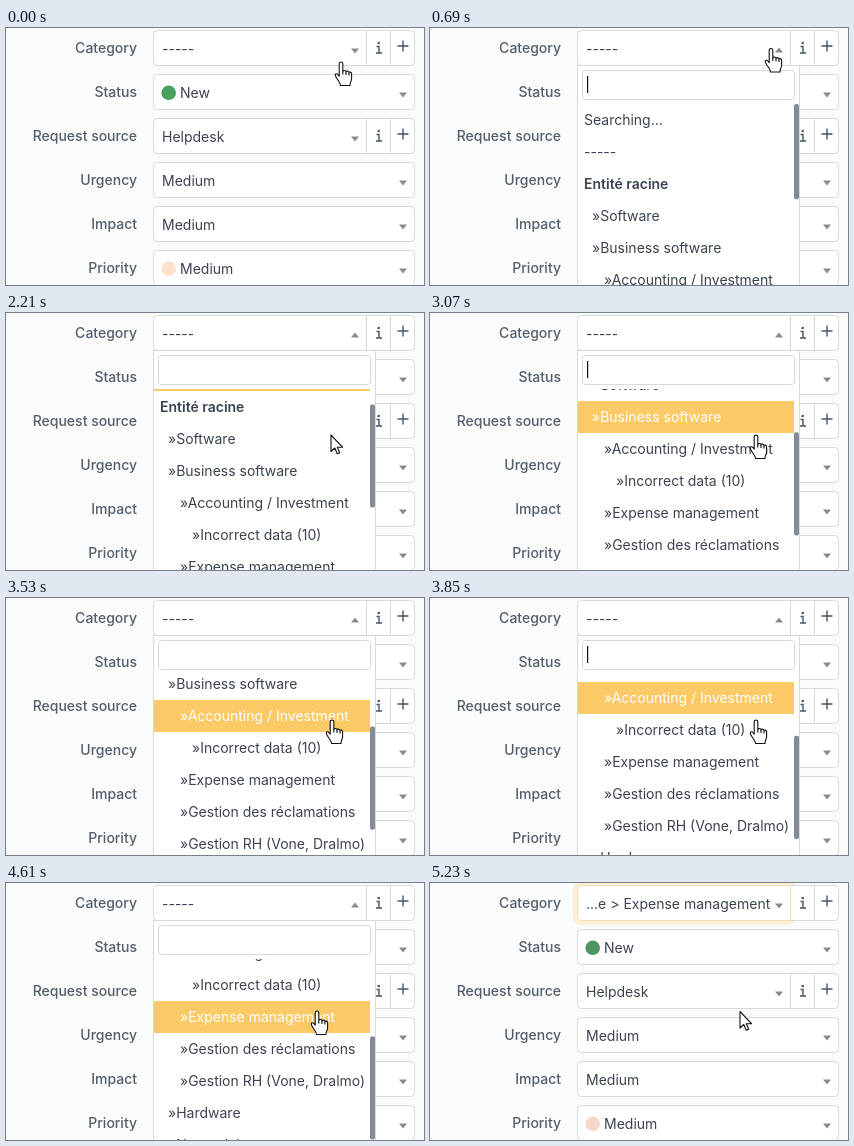
These frames come from a looping animation (418x257 px, 5590 ms). An HTML page:

```html
<!DOCTYPE html>
<html lang="en">
<head>
<meta charset="utf-8">
<title>Category picker</title>
<style>
html, body { margin: 0; width: 100%; height: 100%; overflow: hidden; background: #fafcfc; }
svg { display: block; width: 100vw; height: 100vh; }
text { font: 14px Inter, "Open Sans", sans-serif; fill: #3b4350; white-space: pre; }
.label { font-weight: 500; fill: #545d6b; text-anchor: end; }
.group { font-weight: 600; }
.box { fill: #fff; stroke: #d6dadd; }
.tri { fill: #878b90; }
.icon { fill: none; stroke: #46566a; stroke-width: 1.4; }
.on { fill: #fff; }
.pointer { fill: #fff; stroke: #111; stroke-width: 1.1; stroke-linejoin: round; }
</style>
</head>
<body>
<svg id="stage" viewBox="0 0 418 257">
  <defs><clipPath id="view"><rect x="148" y="76" width="221" height="200"/></clipPath></defs>
  <g id="form"></g>
  <g id="drop">
    <rect class="box" x="147.5" y="37.5" width="222" height="260"/>
    <rect class="box" x="152.5" y="42.5" width="212" height="29" rx="3"/>
    <rect id="caret" x="157" y="48" width="1.2" height="17" fill="#111"/>
    <g clip-path="url(#view)">
      <g id="list"><rect id="mark" x="148" width="216" height="32" fill="#fbca66"/></g>
      <rect id="thumb" x="364" width="5" rx="2" fill="#858a98"/>
    </g>
  </g>
  <g id="cursor" class="pointer">
    <path id="arrow" d="M0 0V16.5L3.8 13 6.2 18.7 8.7 17.7 6.3 12.2H11.5Z"/>
    <g id="hand" transform="translate(1)">
      <path d="M-1.8 1.8a1.8 1.8 0 0 1 3.6 0V9.5c0-1.5 3.2-1.5 3.2.5c0-1.3 3-1.2 3 .8c0-1.2 2.6-1 2.6 1V17c0 2-1.6 3-1.6 6.5H-.5c0-3-2.5-4.5-4.5-8.5c-.8-1.6-1.2-2.8.2-3.2c1.3-.3 2.2 1.2 3 2.4Z"/>
      <path fill="none" d="M1.8 9.5v3M5 10v3M8 11v2.5"/>
    </g>
    <path id="beam" fill="none" d="M-3-8h2.5l.5.5.5-.5H3M0-7.500V7.500M-3 8h2.5l.5-.5.5.5H3"/>
  </g>
</svg>
<script>
const LOOP = 5590, ROW = 32, TOP = 76, VIEW = 200;
const OPEN = 620, LOADED = 920, CLOSE = 4990;
const $ = id => document.getElementById(id);

function add(parent, tag, attrs, text) {
  const node = document.createElementNS('http://www.w3.org/2000/svg', tag);
  for (const key in attrs) node.setAttribute(key, attrs[key]);
  if (text) node.textContent = text;
  return parent.appendChild(node);
}

const form = $('form');
const glow = add(form, 'rect', { x: 143, y: -2, width: 222, height: 44, rx: 7, fill: '#fdefd5' });

function field(i, name, value, buttons, dot) {
  const y = 44 * i + 20, end = buttons ? 361 : 409, mid = end - 12;
  add(form, 'text', { class: 'label', x: 131, y: y + 5 }, name);
  if (buttons) {
    add(form, 'rect', { class: 'box', x: 340.5, y: y - 17.5, width: 68, height: 35, rx: 4 });
    add(form, 'path', { class: 'box', d: `M384.5 ${y - 17.500}v35` });
    add(form, 'path', { class: 'icon', d: `M370.500 ${y - 1.5}h2.5v6.500M370 ${y + 5}h6M391.500 ${y - 2}h11M397 ${y - 7.5}v11` });
    add(form, 'circle', { cx: 372.7, cy: y - 5, r: 1.3, fill: '#46566a' });
  }
  const box = buttons
    ? add(form, 'path', { class: 'box', d: `M360.500 ${y - 17.5}v35H151.500q-4 0-4-4v-27q0-4 4-4Z` })
    : add(form, 'rect', { class: 'box', x: 147.5, y: y - 17.5, width: 261, height: 35, rx: 4 });
  const circle = dot && add(form, 'circle', { cx: 162.7, cy: y + 0.8, r: 7.3 });
  const text = add(form, 'text', { x: dot ? 174 : 156, y: y + 5.5 }, value);
  const tri = add(form, 'path', { class: 'tri', d: `M${mid - 4} ${y + .5}h8l-4 5Z` });
  return { box, circle, text, tri };
}

const category = field(0, 'Category', '-----', true);
const state = field(1, 'Status', 'New', false, true);
field(2, 'Request source', 'Helpdesk', true);
field(3, 'Urgency', 'Medium');
field(4, 'Impact', 'Medium');
const priority = field(5, 'Priority', 'Medium', false, true);

const options = [
  [154, '-----'], [154, 'Entité racine'], [162, '»Software'], [162, '»Business software'],
  [174, '»Accounting / Investment'], [186, '»Incorrect data (10)'], [174, '»Expense management'],
  [174, '»Gestion des réclamations'], [174, '»Gestion RH (Vone, Dralmo)'],
  [162, '»Hardware'], [162, '»Network issue']
].map(([x, label], i) =>
  add($('list'), 'text', { x, y: TOP + ROW * i + 21, class: i === 1 ? 'group' : '' }, label));
const loading = add($('list'), 'text', { x: 154, y: TOP - 11 }, 'Searching…');

// Each list holds [start time, value...]; a value stays until the next entry.
const scrolls = [[0, 0], [1990, 8], [2070, 18], [2140, 26], [2210, 30], [2530, 46], [2610, 60],
  [2990, 70], [3070, 84], [3150, 88], [3230, 90], [3530, 102], [3610, 114], [3690, 120],
  [3990, 132], [4070, 144], [4150, 150]];
const marks = [[0, -1], [LOADED, 0], [2530, 2], [2990, 3], [3530, 4], [3990, 5], [4470, 6]];
const moves = [[0, 334, 34, 'hand'], [80, 336, 30, 'hand'], [150, 339, 24, 'hand'], [220, 340, 20.5, 'hand'],
  [1070, 340, 24, 'hand'], [1130, 339, 34, 'hand'], [1210, 337, 50, 'beam'], [1290, 335, 68, 'beam'],
  [1350, 333, 82, 'hand'], [1430, 332, 94, 'hand'], [1510, 329, 104, 'hand'], [1590, 327, 115, 'arrow'],
  [1670, 326, 119, 'arrow'], [1750, 325, 122, 'arrow'], [2530, 325, 122, 'hand'], [4470, 320, 124, 'hand'],
  [4530, 315, 126, 'hand'], [4610, 310, 128, 'hand'], [CLOSE, 310, 128.500, 'arrow']];

const at = (list, t) => list.findLast(entry => entry[0] <= t).slice(1);
const show = (node, on) => node.setAttribute('display', on ? 'inline' : 'none');

function draw(t) {
  const open = t >= OPEN && t < CLOSE, done = t >= CLOSE, waiting = t < LOADED;
  const [offset] = at(scrolls, t), [mark] = at(marks, t), [x, y, shape] = at(moves, t);

  show($('drop'), open);
  show($('caret'), t >= 690 && Math.floor((t - 590) / 540) % 2 === 0 || t >= 4910);
  show(loading, waiting);
  show($('mark'), mark >= 0);
  $('mark').setAttribute('y', TOP + ROW * mark);
  $('list').setAttribute('transform', `translate(0 ${waiting ? ROW : -offset})`);
  options.forEach((node, i) => node.classList.toggle('on', i === mark));
  const scale = VIEW / (waiting ? 420 : 388);
  $('thumb').setAttribute('y', TOP + offset * scale);
  $('thumb').setAttribute('height', VIEW * scale);

  const focus = done ? Math.min(1, (Math.floor((t - CLOSE) / 80) + 1) / 4) : 0;
  glow.setAttribute('opacity', focus);
  category.box.style.stroke = done ? '#f5dfb5' : '';
  category.text.textContent = done ? '...e > Expense management' : '-----';
  category.tri.setAttribute('d', open ? 'M345 24.500h8l-4-5Z' : 'M345 20.500h8l-4 5Z');
  state.circle.setAttribute('fill', done ? '#4f9463' : '#48a15c');
  priority.circle.setAttribute('fill', done ? '#f4d6ca' : '#fde1cb');

  $('cursor').setAttribute('transform', `translate(${x} ${y})`);
  for (const id of ['arrow', 'hand', 'beam']) show($(id), id === shape);
}

const start = performance.now();
function tick() {
  draw((performance.now() - start) % LOOP);
  requestAnimationFrame(tick);
}
tick();
</script>
</body>
</html>
```
